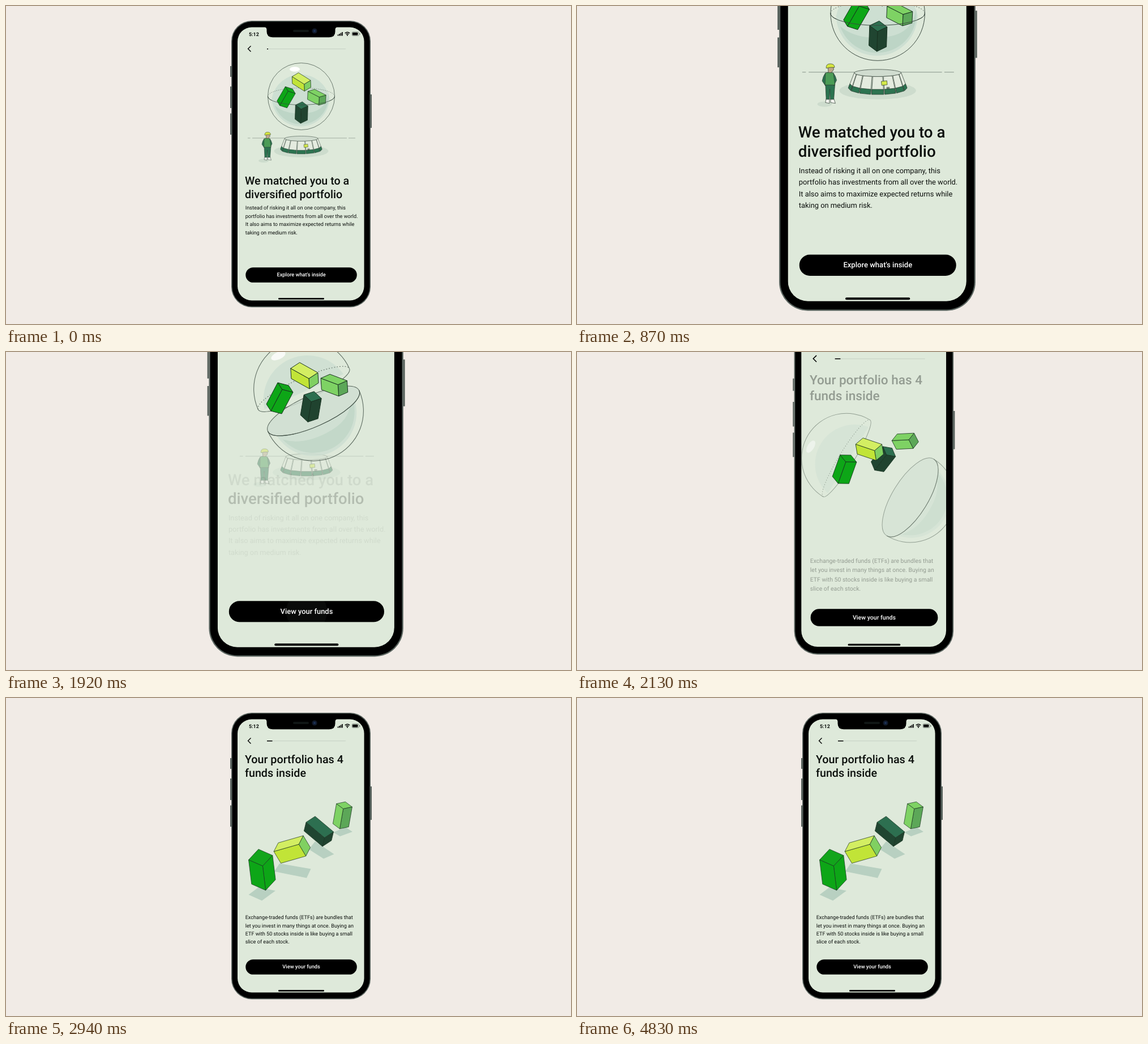
Animation, 998 px wide and 561 px high, one loop 4860 ms. Source, as an HTML page:

```html
<!DOCTYPE html>
<html lang="en">
<head>
<meta charset="utf-8">
<title>Portfolio walkthrough</title>
<style>
  html, body { margin: 0; width: 100%; height: 100%; overflow: hidden; background: #f1ebe6; }
  svg { display: block; width: 998px; height: 561px; }
  text { font-family: Roboto, Inter, sans-serif; fill: #0b0f0c; text-rendering: geometricPrecision; }
  .title { font-size: 19.7px; font-weight: 500; }
  .body { font-size: 9.15px; }
  .label { font-size: 9.25px; font-weight: 500; fill: #fff; text-anchor: middle; }
  .ink { fill: none; stroke: #3a493f; stroke-width: .7; stroke-linejoin: round; }
  .edge { stroke: #2b3a30; stroke-width: .5; stroke-linejoin: round; }
</style>
</head>
<body>
<svg viewBox="0 0 998 561">
  <defs>
    <clipPath id="screenClip"><rect x="409" y="37.5" width="223.6" height="482" rx="25"/></clipPath>
    <clipPath id="buttonClip"><rect x="423.3" y="461.2" width="196.5" height="26.6" rx="13.3"/></clipPath>
  </defs>
  <g id="camera">
    <path d="M397 106v19M397 142v38M397 189.500v37.500M645 156v59" stroke="#56605b" stroke-width="2"/>
    <rect x="398" y="26" width="246" height="505.500" rx="36" fill="#59645f"/>
    <rect x="399.600" y="27.600" width="242.800" height="502.300" rx="34.400"/>

    <g clip-path="url(#screenClip)">
      <rect x="409" y="37" width="224" height="483" fill="#dee9da"/>

      <g id="ground">
        <path d="M427 233h4.500M435 233h167M605 233h12" stroke="#87938a" stroke-width=".7"/>
        <ellipse cx="521.500" cy="256" rx="48" ry="11" fill="#cddccd"/>
        <ellipse cx="455" cy="273" rx="9" ry="3.300" fill="#cddccd"/>
        <ellipse class="edge" cx="521.500" cy="234" rx="29.500" ry="4.500" fill="#d0dccf"/>
        <path id="panels" class="edge" fill="#e4ebdf"/>
        <path id="feet" class="edge" fill="#2c7350"/>
        <path class="edge" d="M526 244.500l7-.8.5 5-7 .8z" fill="#d3e84a"/>
        <path d="M532.500 252h4M532.500 253.500h4" stroke="#3a4a40" stroke-width=".9"/>

        <path class="edge" d="M457 266l-1 5 5 1v-6zM462.500 266v5l6 1-2-6z" fill="#f4f5f0"/>
        <path class="edge" d="M456 247h12l-1.500 20h-4.500l-.5-13-.5 13h-4z" fill="#2c7350"/>
        <path class="edge" d="M456 234q-3 4-4 10l4 6 1-15zM466 234q3 4 4 9l-3.500 7z" fill="#2c7350"/>
        <path class="edge" d="M456 234q5-2 10 0l2 15h-12.500z" fill="#4b9c56"/>
        <path class="edge" d="M459 226h7l.3 4-3 3.500h-3.500z" fill="#bda88a"/>
        <path class="edge" d="M457 228q-.5-5.500 5-5.500t5.500 4.500q-5-.5-10.500 1z" fill="#d6e63f"/>
      </g>

      <g id="dome">
        <path d="M-52 3A52 52 0 0 1 50 3Z" fill="#cddfd2"/>
        <path class="ink" d="M-59 0A59 59 0 0 1 59 0"/>
        <path id="domeBack" class="ink" stroke-dasharray="1.200 2"/>
        <path id="domeFront" class="ink"/>
        <ellipse cx="-11.500" cy="-48" rx="9" ry="4.300" fill="#fff"/>
      </g>
      <g id="bowl">
        <path d="M-52 2A51 51 0 0 0 50 2Z" fill="#cddfd2"/>
        <path d="M-47 16A49 49 0 0 0 48 -6Q44 28 4 30Q-28 32 -47 16Z" fill="#bdd5c6"/>
        <path class="ink" d="M-59 0A59 59 0 0 0 59 0"/>
        <ellipse id="rim" class="ink" rx="59" style="fill:#d0ded2"/>
      </g>
      <g id="shadows" fill="#b8d0c1">
        <path d="M428.500 347L446 334 476 340 452 357.500Z"/>
        <path d="M474 306L483 292 538.500 301.500 531 317.500Z"/>
        <path d="M535 267L546 253 579.500 275.500 561 283.500Z"/>
        <path d="M578 237L600 228 612 236 590 244Z"/>
      </g>
      <g id="boxes" stroke="#17301f" stroke-width=".7" stroke-linejoin="round"></g>
      <path id="bowlFront" class="ink"/>

      <g id="copyA"></g>
      <g id="copyB"></g>

      <text x="429" y="52.500" style="font-size:8.900px;font-weight:700">5:12</text>
      <path d="M586.500 52.500v-2M589 52.500v-3.500M591.500 52.500v-5M594 52.500v-6.500" stroke="#000" stroke-width="1.700"/>
      <path d="M598.700 48q4.300-3.600 8.600 0M600.500 50q2.500-2 5 0" fill="none" stroke="#000" stroke-width="1.400"/>
      <circle cx="603" cy="51.700" r="1.100"/>
      <rect x="611" y="45.700" width="12.500" height="6.800" rx="2" fill="none" stroke="#5f6a61" stroke-width=".7"/>
      <rect x="612" y="46.700" width="9.500" height="4.800" rx="1"/>
      <path d="M625 48v2.500" stroke="#5f6a61"/>
      <path d="M432.500 70.500L427.500 75.500 432.500 80.500" fill="none" stroke="#000" stroke-width="1.400"/>
      <path d="M461 75.700H600" stroke="#c6d0c4"/>
      <path id="progress" stroke="#000" stroke-width="1.500"/>

      <g clip-path="url(#buttonClip)">
        <rect x="423" y="461" width="198" height="27"/>
        <circle id="ripple" cx="521.700" cy="474.500" fill="#dee9da"/>
      </g>
      <text id="labelA" class="label" x="521.600" y="477.300">Explore what's inside</text>
      <text id="labelB" class="label" x="521.600" y="477.300">View your funds</text>
      <rect x="481" y="514.900" width="81" height="2.900" rx="1.400"/>
    </g>

    <path d="M457 37Q460.500 38 460.500 42V45Q460.500 55.200 471 55.200H571Q581.500 55.200 581.500 45V42Q581.500 38 585 37Z"/>
    <rect x="507" y="42" width="28" height="4" rx="2" fill="#101615"/>
    <circle cx="545" cy="44" r="4.600" fill="#111a2b"/>
    <circle cx="545" cy="44" r="2" fill="#1c3157"/>
  </g>
</svg>
<script>
const LOOP = 4860, ZOOM = 0.41;

// Back to front. Angles in degrees: place on the ring, then [spin, tilt, roll] before and after.
const BOXES = [
  { ring: 0, from: [27, 44, 57], to: [-80, 27, 48], top: '#7ed264', left: '#7ed264', right: '#5ca758' },
  { ring: 90, from: [-88, 37, 49], to: [40, 23, 38], top: '#2d6f50', left: '#204531', right: '#20432f' },
  { ring: -90, from: [32, 36, 41], to: [-16, 30, 62], top: '#d3ee62', left: '#c1e437', right: '#80d061' },
  { ring: 180, from: [-60, 20, 58], to: [-97, 45, 40], top: '#12a51b', left: '#0da617', right: '#0da617' }
];

const COPY = {
  copyA: [['title', 422, 314.8, 24, ['We matched you to a', 'diversified portfolio']],
    ['body', 422.7, 359.4, 14.4, ['Instead of risking it all on one company, this',
      'portfolio has investments from all over the world.',
      'It also aims to maximize expected returns while', 'taking on medium risk.']]],
  copyB: [['title', 422, 115.3, 24, ['Your portfolio has 4', 'funds inside']],
    ['body', 422.7, 390.2, 14.4, ['Exchange-traded funds (ETFs) are bundles that',
      'let you invest in many things at once. Buying an',
      'ETF with 50 stocks inside is like buying a small', 'slice of each stock.']]]
};

const $ = id => document.getElementById(id);
const set = (id, attrs) => { for (const k in attrs) $(id).setAttribute(k, attrs[k]); };
const { sin, cos, PI } = Math, RAD = PI / 180;
const ramp = (t, from, to) => Math.min(1, Math.max(0, (t - from) / (to - from)));
const mix = (a, b, u) => a + (b - a) * u;
const smooth = u => u * u * (3 - 2 * u);
const quint = u => u < 0.5 ? 16 * u ** 5 : 1 - 16 * (1 - u) ** 5;

for (const id in COPY) {
  $(id).innerHTML = COPY[id].map(([kind, x, y, step, lines]) => lines.map((line, i) =>
    `<text class="${kind}" x="${x}" y="${y + i * step}">${line}</text>`).join('')).join('');
}
$('boxes').innerHTML = '<path/>'.repeat(BOXES.length * 3);
const faces = $('boxes').children;

// Tapered panels around the front of the pedestal, each with a green foot.
function drawPedestal() {
  const at = (angle, u) => [521.5 + mix(29.5, 36.5, u) * sin(angle * RAD),
    mix(234, 252, u) + mix(4.5, 8, u) * cos(angle * RAD)];
  const band = (mid, from, to) =>
    `M${at(mid - 12, from)}L${at(mid + 12, from)}L${at(mid + 12, to)}L${at(mid - 12, to)}Z`;
  let panels = '', feet = '';
  for (let mid = -78; mid <= 78; mid += 26) {
    panels += band(mid, 0, 1);
    feet += band(mid, 0.75, 1.05);
  }
  set('panels', { d: panels });
  set('feet', { d: feet });
}

// Projected unit axes of a turned box; all three point toward the viewer.
function axes(angles) {
  const [s, t, r] = angles.map(a => a * RAD);
  const side = [-sin(s), cos(s)], rise = [-sin(t) * cos(s), -sin(t) * sin(s)];
  const blend = (p, q) => [0, 1].map(k => side[k] * p + rise[k] * q);
  return [[cos(t) * cos(s), cos(t) * sin(s)], blend(cos(r), sin(r)), blend(-sin(r), cos(r))];
}

function drawBoxes(t) {
  const move = smooth(ramp(t, 1650, 2680)), turn = move ** 1.6;
  const sag = 57 * (1 - move) * Math.sqrt(move);
  BOXES.forEach((box, i) => {
    const n = BOXES.length - 1 - i;
    const along = (1 - 0.89 ** n) / 0.11;
    const x = mix(521.9 + 27 * cos(box.ring * RAD), 452.3 + 53 * along, move);
    const y = mix(161 + 27 * sin(box.ring * RAD), 303 - 35.8 * along, move) + sag;
    const width = mix(15.6, 30.5 * 0.87 ** n, turn);
    const normals = axes(box.from.map((a, k) => mix(a, box.to[k], turn)));
    const edges = normals.map((v, k) => v.map(c => -c * width * (k ? 1 : 2)));
    const corner = [x, y].map((c, k) => c - (edges[0][k] + edges[1][k] + edges[2][k]) / 2);
    normals.forEach(([nx, ny], k) => {
      const p = edges[(k + 1) % 3], q = edges[(k + 2) % 3], face = faces[i * 3 + k];
      face.setAttribute('d', `M${corner}l${p}l${q}l${-p[0]} ${-p[1]}z`);
      face.setAttribute('fill', ny < -Math.abs(nx) ? box.top : nx < 0 ? box.left : box.right);
    });
  });
}

function drawScene(t) {
  const open = smooth(ramp(t, 1650, 2450));
  const drop = 117 * sin(open * PI / 2), gap = 110 * open ** 1.5;
  const half = side => ({
    transform: `translate(${521.5 + 10 * open} ${159.5 + drop}) rotate(${-90 * open})
      translate(0 ${side * gap}) scale(${1 + 0.27 * open})`,
    opacity: 1 - ramp(t, 1800, 2420)
  });
  const arc = (depth, sweep) => `M-59 0A59 ${depth} 0 0 ${sweep} 59 0`;
  const domeDepth = 15 - 8 * open, bowlDepth = 15 + 13 * open;
  set('dome', half(-1));
  set('domeBack', { d: arc(domeDepth, 1) });
  set('domeFront', { d: arc(domeDepth, 0) });
  set('bowl', half(1));
  set('rim', { ry: bowlDepth, opacity: ramp(t, 1650, 1850) });
  set('bowlFront', { d: arc(bowlDepth, 0), ...half(1) });
  set('ground', {
    transform: `translate(521.5 ${233 + drop * 0.95}) scale(${1 - 0.4 * open}) translate(-521.5 -233)`,
    opacity: 1 - ramp(t, 1650, 2080)
  });
}

function render(t) {
  const zoom = 1 + ZOOM * (quint(ramp(t, 282, 772)) - quint(ramp(t, 1665, 2538)));
  set('camera', { transform: `translate(498 516.5) scale(${zoom}) translate(-498 -516.5)` });

  drawScene(t);
  drawBoxes(t);
  set('shadows', { opacity: ramp(t, 2420, 2880) });

  [...$('copyA').children].forEach((line, i) =>
    line.setAttribute('opacity', 1 - ramp(t, 1560, i === 1 ? 2010 : 1945)));
  set('copyB', { opacity: ramp(t, 2040, 2300) });
  set('progress', { d: `M461 75.7h${mix(2, 9.5, ramp(t, 1700, 2200))}` });

  const tap = ramp(t, 1560, 1980), swap = ramp(t, 1680, 1830);
  set('ripple', { r: 26 * Math.min(1, tap * 2), opacity: tap && 0.28 * (1 - tap) });
  set('labelA', { opacity: 1 - swap });
  set('labelB', { opacity: swap });
}

drawPedestal();
const start = performance.now();
function tick() {
  render((performance.now() - start) % LOOP);
  requestAnimationFrame(tick);
}
tick();
</script>
</body>
</html>
```
